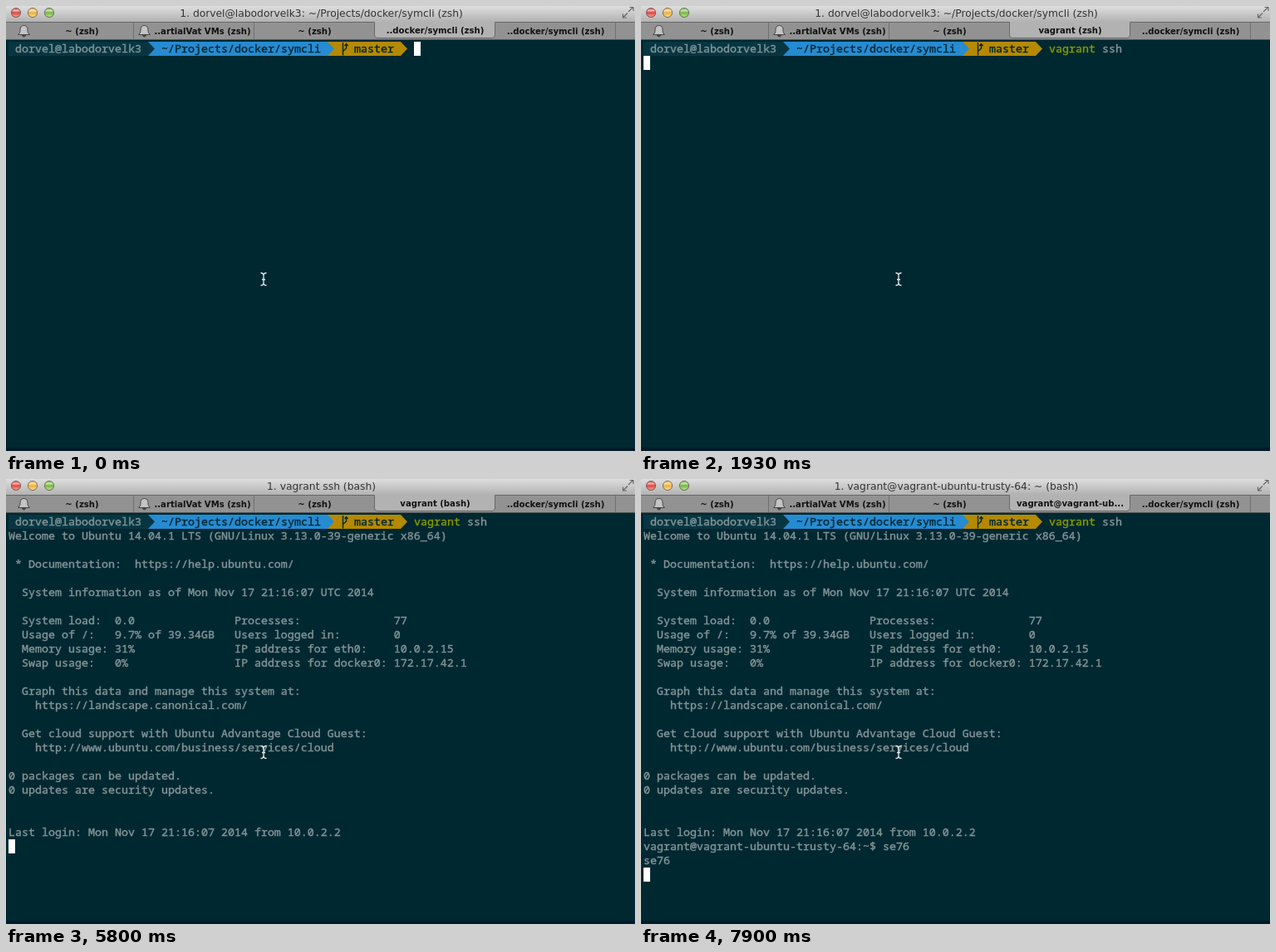
Recreate the animation shown at these times as an HTML page. Size 757 px wide and 536 px high, loop 8 s.

```html
<!DOCTYPE html>
<html lang="en">
<head>
<meta charset="utf-8">
<title>Terminal session</title>
<style>
  html, body { margin: 0; width: 100%; height: 100%; overflow: hidden; background: #002831; }
  svg { display: block; }
  text { white-space: pre; }
  .mono {
    font: 500 13.3333px "Noto Sans Mono", "DejaVu Sans Mono", monospace;
    color: #839496; fill: currentColor; stroke: currentColor; stroke-width: .4px;
  }
  .title { font: 12.3px "DejaVu Sans", sans-serif; fill: #333; text-anchor: middle; }
  .tab { font: bold 10.1px "DejaVu Sans", sans-serif; fill: #111; text-anchor: middle; }
  .mono.ink { color: #002831; }
</style>
</head>
<body>
<svg width="757" height="536" viewBox="0 0 757 536">
  <defs>
    <linearGradient id="bar" x2="0" y2="1">
      <stop stop-color="#dedede"/><stop offset="1" stop-color="#b2b2b2"/>
    </linearGradient>
    <linearGradient id="gloss" x2="0" y2="1">
      <stop stop-color="#fff" stop-opacity=".1"/><stop offset=".25" stop-color="#fff" stop-opacity=".6"/>
      <stop offset=".5" stop-color="#fff" stop-opacity="0"/><stop offset="1" stop-color="#fff" stop-opacity=".5"/>
    </linearGradient>
    <g id="bell" stroke="#444" fill="#c4c4c4">
      <path d="M5.5 13a2 2 0 0 0 4 0z" fill="#444"/>
      <path d="M.5 12.5C3 10.500 3 9 3 6.500C3 3.500 4.500 1.500 7.500 1.500S12 3.500 12 6.500C12 9 12 10.500 14.500 12.500Z"/>
    </g>
  </defs>

  <rect width="757" height="536" fill="#002831"/>
  <rect y="532" width="757" height="4" fill="#001b29"/>

  <rect width="757" height="19" fill="url(#bar)"/>
  <g id="lights"></g>
  <path d="M749 7L754.500 1.500M750.500 1.500H755V6M748 8.500L742.500 14M742.500 9.500V14H747"
        stroke="#666" fill="none" stroke-width="1.2"/>
  <text class="title" id="title" x="379.500" y="13"></text>

  <rect y="19" width="757" height="22" fill="#929292"/>
  <path d="M0 19.500H757" stroke="#686868"/>
  <path d="M0 40.500H757" stroke="#525859"/>
  <path d="M153.500 20V40M298.500 20V40M733.500 20V40" stroke="#707070"/>
  <path d="M443.500 19V35Q443.500 38.500 447 38.500H585Q588.500 38.500 588.500 35V19Z" fill="#b2b2b2"/>
  <path d="M443.500 19.500V35Q443.500 38.500 447 38.500H585Q588.500 38.500 588.500 35V19.500" fill="none" stroke="#686868"/>
  <use href="#bell" x="14" y="22"/>
  <use href="#bell" x="159" y="22"/>
  <text class="tab" x="91.500" y="34">~ (zsh)</text>
  <text class="tab" x="236.500" y="34">..artialVat VMs (zsh)</text>
  <text class="tab" x="371.500" y="34">~ (zsh)</text>
  <text class="tab" id="activeTab" x="516.500" y="33"></text>
  <text class="tab" x="661.500" y="34">..docker/symcli (zsh)</text>

  <path d="M395 43H475L483 51.500L475 60H387V43Z" fill="#b58900"/>
  <path d="M171 43H387L395 51.500L387 60H171Z" fill="#268bd2"/>
  <path d="M3 43H171L179 51.500L171 60H3Z" fill="#073642"/>
  <path d="M405.500 44V59.500M405.500 54.500L409.500 51V46M407.500 48L409.500 45.500L411.500 48" fill="none" stroke="#002831" stroke-width="1.4"/>
  <text class="mono" x="11" y="56">dorvel@labodorvelk3</text>
  <text class="mono ink" x="187" y="56">~/Projects/docker/symcli</text>
  <text class="mono ink" x="419" y="56">master</text>
  <text class="mono" id="command" x="491" y="56"></text>
  <text class="mono" id="argument" x="555" y="56"></text>

  <g id="output"></g>
  <text class="mono" id="shell" x="3" y="447"></text>
  <text class="mono" id="reply" x="3" y="464">se76</text>
  <rect id="cursor" width="8" height="17" fill="#fff"/>
  <path d="M306.500 321.500Q310 321.500 310 324.500V333.500Q310 336.500 306.500 336.500M313.500 321.500Q310 321.500 310 324.500M310 333.500Q310 336.500 313.500 336.500M308 329.500H312"
        fill="none" stroke="#e8e8e8" stroke-width="1.3"/>
</svg>
<script>
const DURATION = 8000, CELL = 8, ROW = 17, LEFT = 3, TOP = 43;
const RUN = 1930, LOGIN = 5800, PROMPT = 5950, ENTER = 7900;
const COMMAND_COLUMN = 61, PROMPT_ROW = 23;
const shellPrompt = "vagrant@vagrant-ubuntu-trusty-64:~$ ";

const banner = `Welcome to Ubuntu 14.04.1 LTS (GNU/Linux 3.13.0-39-generic x86_64)

 * Documentation:  https://help.ubuntu.com/

  System information as of Mon Nov 17 21:16:07 UTC 2014

  System load:  0.0               Processes:              77
  Usage of /:   9.7% of 39.34GB   Users logged in:        0
  Memory usage: 31%               IP address for eth0:    10.0.2.15
  Swap usage:   0%                IP address for docker0: 172.17.42.1

  Graph this data and manage this system at:
    https://landscape.canonical.com/

  Get cloud support with Ubuntu Advantage Cloud Guest:
    http://www.ubuntu.com/business/services/cloud

0 packages can be updated.
0 updates are security updates.


Last login: Mon Nov 17 21:16:07 2014 from 10.0.2.2`;

const titles = [
  [0, "1. dorvel@labodorvelk3: ~/Projects/docker/symcli (zsh)"],
  [2080, "1. vagrant ssh (zsh)"],
  [2980, "1. vagrant ssh (bash)"],
  [PROMPT, "1. vagrant@vagrant-ubuntu-trusty-64: ~ (bash)"]
];
const tabs = [
  [0, "..docker/symcli (zsh)"],
  [RUN, "vagrant (zsh)"],
  [2980, "vagrant (bash)"],
  [PROMPT, "vagrant@vagrant-ub..."]
];
// Time and number of characters typed so far
const commandKeys = [[0, 0], [150, 1], [300, 2], [450, 3], [600, 4], [740, 6], [890, 8], [1190, 10], [1340, 11]];
const inputKeys = [[0, 0], [6720, 1], [6850, 2], [7300, 3], [7600, 4]];

const $ = id => document.getElementById(id);
const latest = (steps, t) => steps.filter(([start]) => start <= t).pop()[1];
const show = (id, visible) => $(id).setAttribute("visibility", visible ? "visible" : "hidden");

function add(parent, name, attributes, text = "") {
  const node = document.createElementNS("http://www.w3.org/2000/svg", name);
  for (const key in attributes) node.setAttribute(key, attributes[key]);
  node.textContent = text;
  $(parent).append(node);
}

["#e2453d", "#eeb13a", "#78b83c"].forEach((fill, i) => {
  const circle = { cx: 12 + 20 * i, cy: 8, r: 5.6 };
  add("lights", "circle", { ...circle, fill, stroke: "#555", "stroke-opacity": .7 });
  add("lights", "circle", { ...circle, r: 5, fill: "url(#gloss)" });
});
banner.split("\n").forEach((line, i) =>
  add("output", "text", { class: "mono", x: LEFT, y: TOP + 13 + ROW * (i + 1) }, line));

function cursorCell(t, commandLength, inputLength) {
  if (t < RUN) return [COMMAND_COLUMN + commandLength, 0];
  if (t < LOGIN) return [0, 1];
  if (t < PROMPT) return [0, PROMPT_ROW];
  if (t < ENTER) return [shellPrompt.length + inputLength, PROMPT_ROW];
  return [0, PROMPT_ROW + 2];
}

function draw(now) {
  const t = now % DURATION;
  const commandLength = latest(commandKeys, t), inputLength = latest(inputKeys, t);
  const typed = "vagrant ssh".slice(0, commandLength);
  $("title").textContent = latest(titles, t);
  $("activeTab").textContent = latest(tabs, t);
  $("command").textContent = typed.slice(0, 7);
  $("command").style.color = commandLength < 7 ? "#dc322f" : "#859900";
  $("argument").textContent = typed.slice(8);
  $("argument").style.textDecoration = commandLength < 11 ? "underline" : "none";
  $("shell").textContent = shellPrompt + "se76".slice(0, inputLength);
  show("output", t >= LOGIN);
  show("shell", t >= PROMPT);
  show("reply", t >= ENTER);
  const [column, row] = cursorCell(t, commandLength, inputLength);
  $("cursor").setAttribute("x", LEFT + CELL * column);
  $("cursor").setAttribute("y", TOP + ROW * row);
  requestAnimationFrame(draw);
}
requestAnimationFrame(draw);
</script>
</body>
</html>
```
